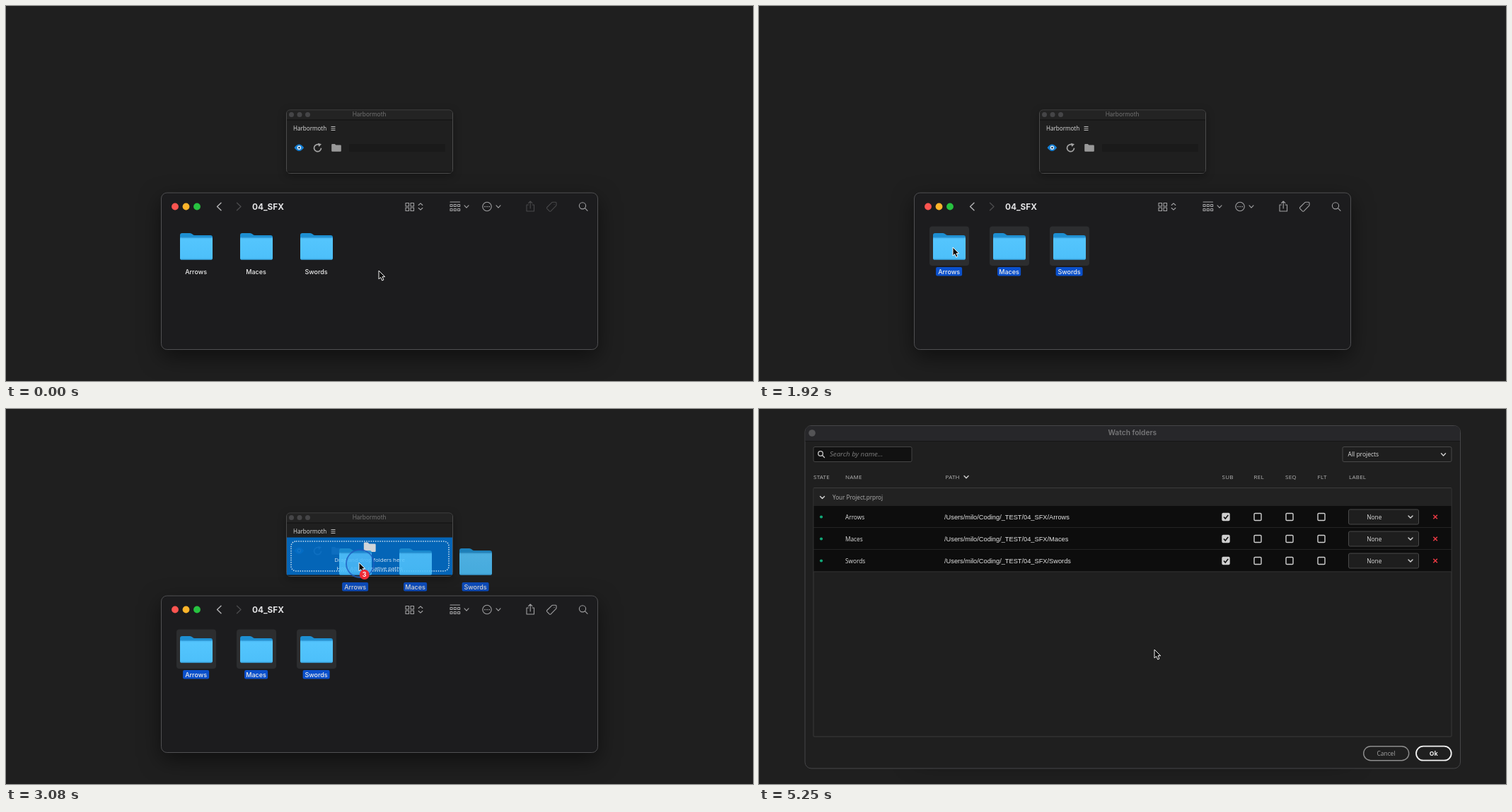
An HTML page that plays this animation: 1056 by 530 pixels, repeating every 7500 ms.

```html
<!DOCTYPE html>
<html lang="en">
<head>
<meta charset="utf-8">
<title>Watch folders</title>
<style>
  html, body { margin: 0; width: 100%; height: 100%; overflow: hidden; background: #1f1f1f; }
  svg { display: block; }
  .mac { font-family: Inter, "Liberation Sans", sans-serif; }
  .ui { font-family: "Open Sans", "Noto Sans", sans-serif; }
  .path { font-family: "Liberation Sans", Arial, sans-serif; font-size: 9.26px; fill: #e4e4e4; }
  .mid { text-anchor: middle; }
  .head { font-size: 8px; letter-spacing: .25px; fill: #b4b4b4; font-weight: 500; }
  .name { font-size: 8.3px; fill: #e2e2e2; }
  .line { fill: none; stroke: #a0a0a2; stroke-width: 1.1; stroke-linecap: round; stroke-linejoin: round; }
  .chev { stroke: #d0d0d0; stroke-width: 1.4; }
  .field { fill: #1e1e1e; stroke: #494949; }
  .finder { fill: #1c1c1e; stroke: #505052; filter: drop-shadow(0 10px 15px rgba(0, 0, 0, .5)); }
  .panel { fill: #1f1f1f; stroke: #4b4b4b; filter: drop-shadow(0 3px 6px rgba(0, 0, 0, .3)); }
  .label { font-size: 9px; font-weight: 500; fill: #ececec; text-anchor: middle; }
  .off { visibility: hidden; }
</style>
</head>
<body>
<svg width="1056" height="530" viewBox="0 0 1056 530">
  <defs>
    <linearGradient id="front" x2="0" y2="1">
      <stop offset="0" stop-color="#46b6f3"/>
      <stop offset=".12" stop-color="#54c5fd"/>
      <stop offset=".92" stop-color="#4dc0fa"/>
      <stop offset="1" stop-color="#36a3df"/>
    </linearGradient>
    <g id="folder">
      <path d="M0 4Q0 1 3 1H14Q16 1 17.5 2.5T21 4H43Q46 4 46 7V30H0Z" fill="#1d8fd2"/>
      <rect y="6.5" width="46" height="32.3" rx="2.6" fill="url(#front)"/>
      <path d="M1.5 7H44.5" stroke="#1a7cba" stroke-width=".8"/>
    </g>
    <path id="down" d="M-3-1.6L0 1.6L3-1.6"/>
    <path id="bin" d="M0 1Q0 0 1 0H4.6L6.2 1.7H12.6Q13.6 1.7 13.6 2.7V9.8Q13.6 10.8 12.6 10.8H1Q0 10.8 0 9.8Z"/>
  </defs>

  <!-- extension panel -->
  <g>
    <rect class="panel" x="396.5" y="147" width="235" height="89.5" rx="5"/>
    <path d="M397 160.5V152Q397 147.5 401.500 147.500H626.500Q631 147.500 631 152V160.500Z" fill="#232323"/>
    <path d="M397 161H631M397 235H631" stroke="#121212"/>
    <g fill="#454547"><circle cx="403.5" cy="153.500" r="3.5"/><circle cx="415" cy="153.500" r="3.5"/><circle cx="426.500" cy="153.500" r="3.5"/></g>
    <text class="mac mid" x="513.500" y="156.300" font-size="8.4" fill="#707070">Harbormoth</text>
    <text class="ui" x="406" y="175.500" font-size="8.100" fill="#e0e0e0">Harbormoth</text>
    <path d="M459.500 170.500H465.500M459.500 173H465.500M459.500 175.500H465.500" stroke="#bdbdbd"/>
    <path d="M407.500 200.300Q414.300 190.900 421.200 200.300Q414.300 209.700 407.500 200.300Z" fill="#1681d6"/>
    <circle cx="414.400" cy="200.300" r="2.700" fill="#e6f2fb"/><circle cx="414.400" cy="200.300" r="1.300" fill="#16395a"/>
    <path d="M443.500 196.700A5 5 0 1 0 445.500 200.700" fill="none" stroke="#a4a4a4" stroke-width="1.700"/>
    <path d="M441 193.700L446 195.200L442.300 199Z" fill="#a4a4a4"/>
    <use href="#bin" x="460.200" y="194.900" fill="#999"/>
    <rect x="485" y="195" width="136" height="11" rx="1" fill="#1a1a1a"/>
    <g id="drop" class="off">
      <rect x="397" y="181.500" width="234" height="53" fill="#036bc3" opacity=".93"/>
      <rect x="403" y="187" width="223" height="42" rx="7" fill="none" stroke="#c9def0" stroke-width="1.500" stroke-dasharray="1.500 1.700"/>
      <use href="#bin" transform="translate(505.800 188.500) scale(1.240)" fill="#d0d4d8"/>
      <g class="ui mid" font-size="7.900" fill="#d9e8f6">
        <text x="514" y="216.300">Drag and drop folders here</text>
        <text x="514" y="228.300">Hold Alt for relative paths</text>
      </g>
    </g>
  </g>

  <!-- file browser -->
  <rect class="finder" x="219.500" y="264" width="617" height="221.500" rx="8"/>
  <circle cx="239" cy="283.500" r="4.900" fill="#fc5450"/>
  <circle cx="254.500" cy="283.500" r="4.900" fill="#fdb42a"/>
  <circle cx="270" cy="283.500" r="4.900" fill="#27c340"/>
  <g class="line">
    <path d="M304 278.300L298.500 283.500L304 288.700" stroke="#b4b4b6" stroke-width="1.400"/>
    <path d="M326.500 278.300L332 283.500L326.500 288.700" stroke="#4a4a4c" stroke-width="1.400"/>
    <path d="M565 278.500h4.500v4.500h-4.500zM572 278.500h4.500v4.500h-4.500zM565 285h4.500v4.500h-4.500zM572 285h4.500v4.500h-4.500z"/>
    <path d="M583.200 281.500L586 278.800L588.800 281.500M583.200 285.500L586 288.200L588.800 285.500"/>
    <path d="M628 277H641.500M628 280.500h3v3h-3zM633.300 280.500h3v3h-3zM638.600 280.500h3v3h-3zM628 286.500h3v3h-3zM633.300 286.500h3v3h-3zM638.600 286.500h3v3h-3z"/>
    <use href="#down" x="651" y="283.500"/>
    <circle cx="680" cy="283.500" r="6.200"/>
    <path d="M677 283.500h.1M680 283.500h.1M683 283.500h.1" stroke-width="1.700"/>
    <use href="#down" x="696" y="283.500"/>
    <g id="tools">
      <path d="M738.500 281H736V290H746.500V281H744M741.200 286V276.300M738.500 278.700L741.200 276L743.900 278.700"/>
      <path d="M764.800 284.500L771.500 277.800Q772 277.300 773 277.300H777Q778 277.300 778 278.300V281.300Q778 282 777.300 282.700L770.200 289.800Q769.200 290.700 768.200 289.800L764.800 286.400Q763.900 285.400 764.800 284.500ZM775 280.200h.1"/>
    </g>
    <circle cx="815" cy="282.300" r="4.600"/><path d="M818.400 285.700L822 289.300"/>
  </g>
  <text class="mac" x="348" y="287.600" font-size="11.800" font-weight="700" fill="#e4e4e6">04_SFX</text>
  <g id="items" class="mac"></g>
  <rect id="marquee" fill="#8fa5a8" fill-opacity=".2" stroke="#7d8a8c" stroke-opacity=".75"/>
  <g id="ghosts" class="mac off" opacity=".87"></g>

  <!-- dialog -->
  <g id="dialog" class="off">
    <rect x="65" y="23.500" width="926.500" height="484.500" rx="9" fill="#1f1f1f" stroke="#464648"/>
    <path d="M65.500 45V32Q65.500 24 73.500 24H983Q991 24 991 32V45Z" fill="#27272a"/>
    <path d="M65.500 45.500H991" stroke="#151515"/>
    <circle cx="75" cy="34" r="4.800" fill="#545456"/>
    <text class="mac mid" x="527.800" y="37.400" font-size="10.200" font-weight="600" fill="#777779">Watch folders</text>
    <g id="content" class="ui off">
      <rect x="77" y="53.500" width="139" height="21" rx="2" fill="#111" stroke="#454545"/>
      <g class="line" style="stroke:#c8c8c8;stroke-width:1.300"><circle cx="87" cy="63" r="3.300"/><path d="M89.500 65.500L92.500 68.500"/></g>
      <text x="100" y="67.400" font-size="9.700" font-style="italic" fill="#7c7c7c">Search by name...</text>
      <rect class="field" x="825" y="53.500" width="154" height="21" rx="2"/>
      <text x="832.500" y="67.200" font-size="8.500" fill="#dedede">All projects</text>
      <use class="line chev" href="#down" x="967.500" y="64.300"/>
      <g id="heads" class="head"></g>
      <use class="line chev" href="#down" x="293" y="96.200"/>
      <rect x="77" y="111.500" width="902" height="351.500" rx="1" fill="#1f1f1f" stroke="#3b3b3b"/>
      <rect x="77.500" y="112" width="901" height="25" fill="#222"/>
      <use class="line chev" href="#down" x="89.500" y="125"/>
      <text x="104" y="128.200" font-size="8.100" fill="#b0b0b0">Your Project.prproj</text>
      <g id="rows"></g>
      <rect x="854.700" y="476.700" width="64" height="20" rx="10" fill="none" stroke="#8d8d8d" stroke-width="1.400"/>
      <text class="mid" x="886.500" y="490" font-size="8.400" fill="#a8a8a8">Cancel</text>
      <rect x="929" y="476.700" width="49.700" height="20" rx="10" fill="none" stroke="#f2f2f2" stroke-width="1.800"/>
      <text class="mid" x="953.800" y="490" font-size="8.400" font-weight="700" fill="#f4f4f4">Ok</text>
    </g>
  </g>

  <!-- pointer -->
  <circle id="ring" fill="#1d6fd8" fill-opacity=".1" stroke="#1f5cc0" stroke-opacity=".8" stroke-width="1.800"/>
  <g id="pointer">
    <path d="M0 0V12L2.700 9.500L4.700 14L6.900 13L5 8.700H8.700Z" fill="#0a0a0a" stroke="#f2f2f2" stroke-width="1" stroke-linejoin="round"/>
    <g id="badge" class="off">
      <circle cx="7.700" cy="17" r="7" fill="#ee2b37"/>
      <text class="mac mid" x="7.700" y="20.200" font-size="9" font-weight="600" fill="#fff">3</text>
    </g>
  </g>
</svg>
<script>
  const $ = id => document.getElementById(id);
  const names = ["Arrows", "Maces", "Swords"];
  const itemX = i => 246 + 85 * i;

  const item = (name, i) => {
    const x = itemX(i), w = [37, 33, 38][i];
    return `<g><g class="sel off">
      <rect x="${x - 5}" y="311.5" width="56" height="55.5" rx="4" fill="#2c2d2f"/>
      <rect x="${x + 22.6 - w / 2}" y="369" width="${w}" height="12.5" rx="2" fill="#0a50cc"/></g>
      <use href="#folder" x="${x}" y="320"/>
      <text class="label" x="${x + 22.6}" y="378.5">${name}</text></g>`;
  };
  $("items").innerHTML = names.map(item).join("");
  $("ghosts").innerHTML = names.map(item).join("");
  const marks = [...document.querySelectorAll("#items .sel")];
  // dragged copies show only the label highlight
  document.querySelectorAll("#ghosts .sel").forEach(s => {
    s.firstElementChild.remove();
    s.classList.remove("off");
  });

  const heads = { STATE: 77, NAME: 122, PATH: 263.5, SUB: 654.5, REL: 699.5, SEQ: 744, FLT: 789.5, LABEL: 834 };
  $("heads").innerHTML = Object.entries(heads)
    .map(([text, x]) => `<text x="${x}" y="99">${text}</text>`).join("");

  const box = (x, y, on) =>
    `<rect x="${x - 5}" y="${y - 5}" width="10" height="10" rx="1.3" fill="${on ? "#cfcfcf" : "none"}" stroke="#cfcfcf" stroke-width="1.4"/>` +
    (on ? `<path d="M${x - 3} ${y}l2.200 2.500l4-5" fill="none" stroke="#111" stroke-width="1.600"/>` : "");

  $("rows").innerHTML = names.map((name, i) => {
    const y = 152.5 + 31 * i;
    return `<rect x="77.500" y="${y - 15.500}" width="901" height="30.500" fill="#0d0d0d"/>
      <path d="M77.500 ${y + 15.500}H978.500" stroke="#303030"/>
      <circle cx="88" cy="${y}" r="2.100" fill="#12a878"/>
      <text class="name" x="122" y="${y + 3.200}">${name}</text>
      <text class="path" x="262" y="${y + 3}">/Users/milo/Coding/_TEST/04_SFX/${name}</text>
      ${[0, 1, 2, 3].map(k => box(660 + 45 * k, y, k === 0)).join("")}
      <rect class="field" x="833.500" y="${y - 10.500}" width="99" height="21" rx="2"/>
      <text class="name mid" x="869.800" y="${y + 3}">None</text>
      <use class="line chev" href="#down" x="921" y="${y}"/>
      <path d="M953.300 ${y - 2.800}l5.600 5.600m0-5.600l-5.600 5.600" stroke="#ea3a44" stroke-width="1.500"/>`;
  }).join("");

  const linear = u => u;
  const inOut = u => u * u * (3 - 2 * u);
  const out = u => u * (2 - u);

  // time, x, y, easing towards this point
  const keys = [
    [0, 527, 374], [1000, 527, 374], [1583, 257, 357, inOut], [1667, 253, 352, linear],
    [1833, 274, 341, out], [2417, 274, 341], [2500, 319, 321, linear], [3083, 499, 217, out],
    [3500, 499, 217], [4220, 559, 340, inOut], [7500, 559, 340]
  ];
  const start = [527, 375], grab = [274, 341];
  const LOOP = 7500, STEP = 1000 / 12;

  function place(t) {
    const n = keys.findIndex((k, j) => j > 0 && t <= k[0]);
    const [t0, x0, y0] = keys[n - 1], [t1, x1, y1, ease = linear] = keys[n];
    const u = ease((t - t0) / (t1 - t0));
    return [x0 + (x1 - x0) * u, y0 + (y1 - y0) * u];
  }

  const show = (el, on) => el.classList.toggle("off", !on);
  const within = (t, a, b) => t >= a && t < b;

  function draw(now) {
    const t = Math.floor(((now % LOOP) + 5) / STEP) * STEP % LOOP;
    const [x, y] = place(t);
    const selecting = within(t, 1040, 1720), dragging = within(t, 2460, 3200);
    $("pointer").setAttribute("transform", `translate(${x} ${y})`);

    const ring = $("ring");
    show(ring, selecting || dragging);
    ring.setAttribute("cx", x + 1.5);
    ring.setAttribute("cy", y + 1.5);
    ring.setAttribute("r", within(t, 1040, 1120) || within(t, 2460, 2540) ? 14 : 19.5);

    const m = $("marquee");
    show(m, selecting);
    m.setAttribute("x", Math.round(x) + .5);
    m.setAttribute("y", Math.round(y) + 1.5);
    m.setAttribute("width", Math.max(0, start[0] - Math.round(x) - 1));
    m.setAttribute("height", Math.max(0, start[1] - Math.round(y) - 2));

    marks.forEach((s, i) => show(s, t > 1720 || selecting && x < itemX(i) + 46));
    $("tools").style.stroke = t > 1720 ? "#a0a0a2" : "#48484a";

    show($("ghosts"), dragging);
    show($("badge"), dragging);
    $("ghosts").setAttribute("transform", `translate(${x - grab[0]} ${y - grab[1]})`);
    show($("drop"), dragging && y < 235 && x > 396);

    show($("dialog"), t >= 4240);
    show($("content"), t >= 4400);
  }

  const begin = performance.now();
  function tick() {
    draw(performance.now() - begin);
    requestAnimationFrame(tick);
  }
  draw(0);
  requestAnimationFrame(tick);
</script>
</body>
</html>
```
